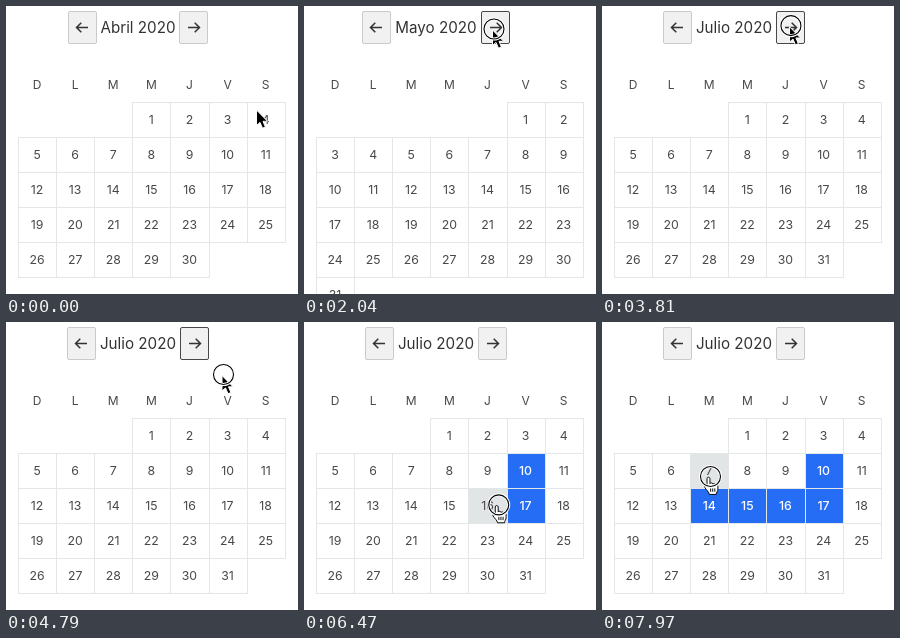
Write an HTML page that moves like this. It is 292 px wide and 288 px high and loops after 8 s.

```html
<!DOCTYPE html>
<html lang="es">
<head>
<meta charset="utf-8">
<title>Calendario</title>
<style>
  html, body { margin: 0; width: 100%; height: 100%; overflow: hidden; background: #fff; }
  svg { display: block; font-family: Inter, Roboto, sans-serif; text-anchor: middle; fill: #484848; }
</style>
</head>
<body>
<svg id="stage" width="292" height="288" viewBox="0 0 292 288"></svg>
<script>
const LOOP = 8000, STEP = 88, CENTER = 132, TITLE = 15.2;
const LEFT = 12, TOP = 96.5, CELL_W = 38.1, CELL_H = 35;
const MONTHS = ['Abril', 'Mayo', 'Junio', 'Julio'];
const stage = document.getElementById('stage');
const pen = document.createElement('canvas').getContext('2d');
pen.font = TITLE + 'px Inter, Roboto, sans-serif';

// pointer path: start time, end time, target x, target y
const path = [
  [0, 0, 252, 103],
  [270, 610, 250, 62],
  [1060, 1330, 188, 31],
  [1420, 1690, 190, 23],
  [3470, 4250, 187, 13.5],
  [4610, 4790, 217.5, 52.5],
  [4880, 4970, 250, 156],
  [5240, 5330, 228, 154],
  [5420, 5680, 227.5, 182],
  [5860, 6560, 190, 183],
  [6740, 7100, 149.5, 182.5],
  [7280, 7540, 112, 183],
  [7720, 7970, 108.5, 154.5]
];
const nextClicks = [1510, 2480, 3560];  // presses of the right button
const HOLD = 180;
const PICKING = 5420;  // from here on every move starts with a click on a day

function pointerAt(t) {
  let x = 0, y = 0;
  for (const [from, to, tx, ty] of path) {
    if (t < from) break;
    const steps = Math.round((to - from) / STEP);
    const done = steps ? Math.floor((t - from) / (to - from) * steps + 1e-6) : 0;
    const p = Math.min(1, (done + 1) / (steps + 1));
    const ease = p * p * (3 - 2 * p);
    x += (tx - x) * ease;
    y += (ty - y) * ease;
  }
  return [x, y];
}

function dayAt(x, y, first) {
  const col = Math.floor((x - 2 - LEFT) / CELL_W), row = Math.floor((y - TOP) / CELL_H);
  return row < 0 ? 0 : row * 7 + col - first + 1;
}

function text(x, y, size, label, extra = '') {
  return `<text x="${x}" y="${y}" font-size="${size}" ${extra}>${label}</text>`;
}

function button(x, dir, focused, pressed) {
  return `<rect x="${x}" y="5.5" width="28" height="32" rx="1.5"
    fill="${pressed ? '#dcdcdc' : '#f1f1f1'}" stroke="${focused ? '#484848' : '#cacaca'}"/>
    <path transform="translate(${x + 14} 21.5) scale(${dir} 1)" d="M-5.5 0H6M1.2 -4.8L6 0L1.2 4.8"
    fill="none" stroke="#333" stroke-width="1.5"/>`;
}

const lineX = col => LEFT + Math.round(col * CELL_W) + .5;

function cell(day, first, picked, hovered) {
  const i = first + day - 1, col = i % 7;
  const y = TOP + Math.floor(i / 7) * CELL_H;
  const fill = picked ? '#246df4' : hovered ? '#e1e5e6' : '#fff';
  return `<rect x="${lineX(col)}" y="${y}" width="${lineX(col + 1) - lineX(col)}" height="${CELL_H}"
    fill="${fill}" stroke="#e4e7e7"/>` +
    text(LEFT + (col + .5) * CELL_W, y + 21.8, 12.3, day, picked ? 'fill="#fff" font-weight="500"' : '');
}

function pointer(x, y, hand, ring) {
  const arrow = `<path d="M-1.5 1V16.5L2 13.4L4.5 19.2L7.4 18L5 12.3H9.6Z" fill="#000" stroke="#fff"/>`;
  const finger = `<path transform="translate(-1 1) scale(.95)" d="M-2.6 10V1.2C-2.6 -.9 .3 -.9 .5 1.2V6.5
    C1 5.2 3.2 5.3 3.5 7C4.2 5.9 6 6.2 6.3 7.8C7.3 7 8.8 7.6 8.8 9.2V12.5C8.8 14.5 7.2 15.5 7.2 17.8H-.2
    C-.5 15.3 -3.3 13.2 -4.9 10.6C-5.8 8.8 -4 8.2 -2.6 10ZM1.2 11.5V15M3.4 11.5V15M5.6 11.5V15"
    fill="#fff" stroke="#000"/>`;
  const circle = `<circle r="10" fill="none" stroke="#fff" stroke-width="3"/>
    <circle r="10" fill="none" stroke="#000" stroke-width="1.1"/>`;
  return `<g transform="translate(${x} ${y})">${hand ? finger : arrow}${ring ? circle : ''}</g>`;
}

function draw(t) {
  const month = nextClicks.filter(c => t >= c + HOLD).length;
  const name = MONTHS[month] + ' 2020';
  const first = new Date(2020, month + 3, 1).getDay();
  const count = new Date(2020, month + 4, 0).getDate();

  const [x, y] = pointerAt(t);
  const over = month === 3 ? dayAt(x, y, first) : 0;
  const picked = path.filter(m => m[0] >= PICKING && t >= m[0])
    .map(m => dayAt(...pointerAt(m[0] - 1), first));
  const pressed = nextClicks.some(c => t >= c && t < c + HOLD);
  const focused = t >= nextClicks[0] && t < PICKING;

  const side = Math.round(pen.measureText(name).width / 2 + 4) + .5;
  let out = button(CENTER - side - 28, -1, false, false) +
    button(CENTER + side, 1, focused, pressed) +
    text(CENTER, 27.3, TITLE, name, 'fill="#333"');
  [...'DLMMJVS'].forEach((d, i) => out += text(LEFT + (i + .5) * CELL_W, 83, 12, d));
  for (let day = 1; day <= count; day++)
    out += cell(day, first, picked.includes(day), day === over);
  return out + pointer(x, y, over > 0, t >= path[1][0]);
}

let last = '';
function frame() {
  const next = draw(performance.now() % LOOP);
  if (next !== last) stage.innerHTML = last = next;
  requestAnimationFrame(frame);
}
frame();
</script>
</body>
</html>
```
